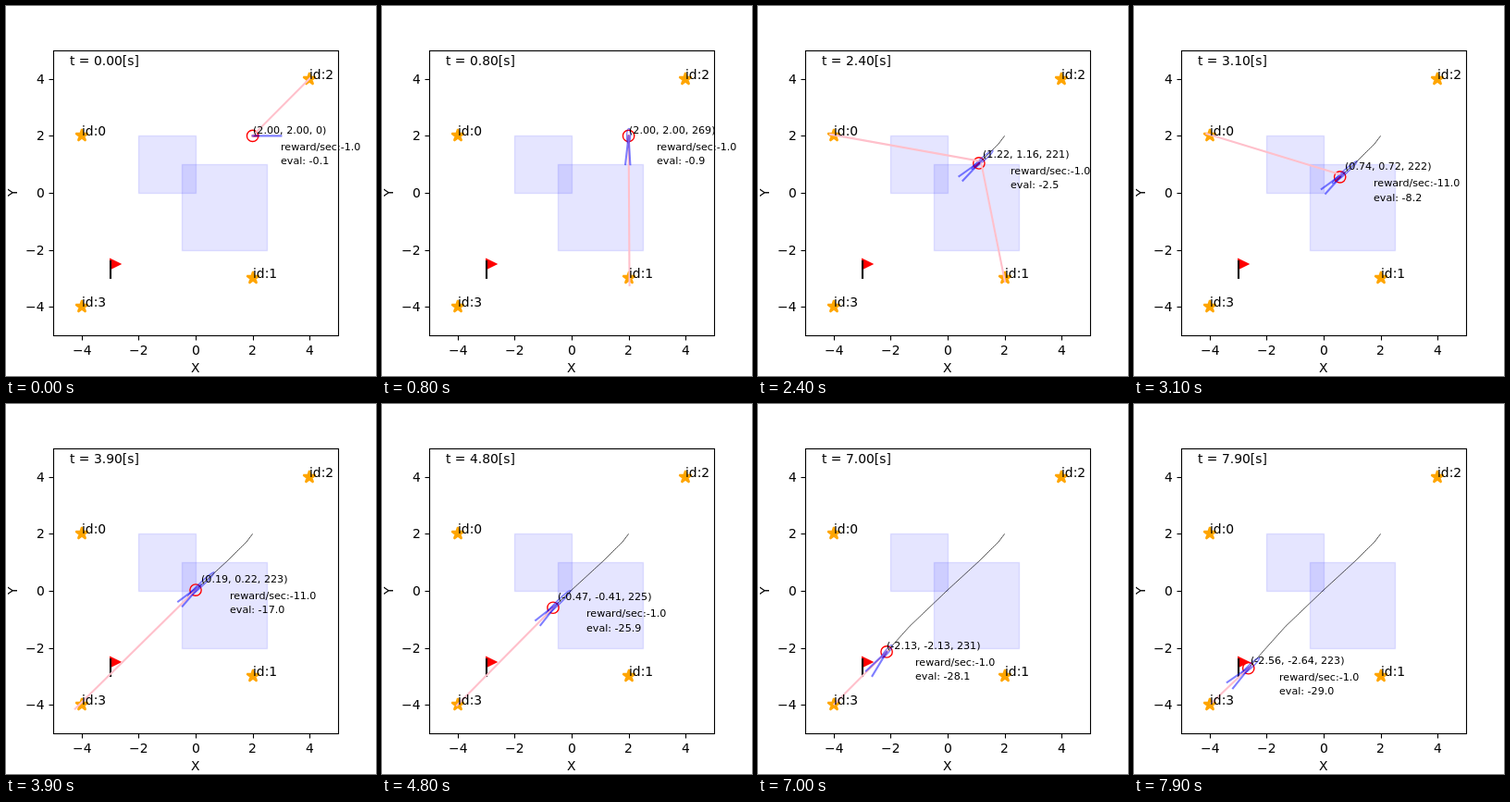
These frames come from a looping animation (400 by 400 pixels, 8 s). An HTML page with a canvas:

```html
<!DOCTYPE html>
<html lang="en">
<head>
<meta charset="utf-8">
<title>Robot localisation</title>
<style>
html, body { margin: 0; width: 100%; height: 100%; overflow: hidden; background: #fff; }
canvas { display: block; }
</style>
</head>
<body>
<canvas id="stage" width="400" height="400"></canvas>
<script>
const ctx = document.getElementById('stage').getContext('2d');
const UNIT = 30.8, STEPS = 80, PT = 100 / 72;
const px = x => 205 + UNIT * x;
const py = y => 202 - UNIT * y;
const rad = deg => deg * Math.PI / 180;
const snap = v => Math.round(v) + 0.5;
const clamp = (v, lo, hi) => Math.min(hi, Math.max(lo, v));

const landmarks = [[-4, 2], [2, -3], [4, 4], [-4, -4]];
const puddles = [[-2, 0, 0, 2], [-0.5, -2, 2.5, 1]];
const turnEnd = 11, puddleEnter = 27, puddleLeave = 48;

// Believed route: step, x, y, heading in degrees
const route = [
  [0, 2, 2, 0],
  [turnEnd, 2, 2, -126],
  [14, 1.81, 1.74, -127],
  [24, 1.22, 1.16, -139],
  [39, 0.19, 0.22, -137],
  [58, -1.21, -1.12, -133],
  [70, -2.13, -2.13, -129],
  [79, -2.56, -2.64, -137]
];

function stateAt(n) {
  const i = Math.max(1, route.findIndex(k => k[0] >= n));
  const a = route[i - 1], b = route[i];
  const u = (n - a[0]) / (b[0] - a[0]);
  const [ex, ey, heading] = [1, 2, 3].map(j => a[j] + (b[j] - a[j]) * u);
  // The belief trails the true position by a slowly swinging error.
  const lag = 0.19 * Math.abs(Math.sin(Math.PI * Math.max(0, n - turnEnd) / 60));
  return {
    ex, ey, heading, x: ex - lag, y: ey - lag,
    spread: Math.min(n, 4.5 + n / 20),
    reach: Math.min(n, 8 + 60 * lag)
  };
}

const states = Array.from({ length: STEPS }, (_, n) => stateAt(n));

function noise(seed) {
  const v = Math.sin(seed * 12.9898) * 43758.5453;
  return (v - Math.floor(v)) * 2 - 1;
}

function observe(n) {
  const s = states[n], seen = [];
  landmarks.forEach(([lx, ly], id) => {
    const dist = Math.hypot(lx - s.x, ly - s.y);
    const dir = Math.atan2(ly - s.y, lx - s.x);
    const turn = dir - rad(s.heading);
    const off = Math.atan2(Math.sin(turn), Math.cos(turn));
    if (dist >= 6 || Math.abs(off) > rad(60)) return;
    const d = dist * (1 + 0.05 * noise(n * 4 + id + 1));
    const a = dir + 0.015 * noise(n * 7 + id + 400);
    seen.push([px(s.x + d * Math.cos(a)), py(s.y + d * Math.sin(a))]);
  });
  return seen;
}

function line(points, color, width, cap = 'butt') {
  ctx.strokeStyle = color;
  ctx.lineWidth = width;
  ctx.lineCap = cap;
  ctx.lineJoin = 'round';
  ctx.beginPath();
  points.forEach(p => ctx.lineTo(...p));
  ctx.stroke();
}

// Markers sit on whole pixels.
function marker(x, y, points, color, join) {
  ctx.fillStyle = ctx.strokeStyle = color;
  ctx.lineWidth = 1.5 * PT;
  ctx.lineJoin = join;
  ctx.beginPath();
  points.forEach(([dx, dy]) => ctx.lineTo(Math.round(px(x)) + dx, Math.round(py(y)) + dy));
  ctx.closePath();
  ctx.fill();
  ctx.stroke();
}

function oval(x, y, rx, ry, tilt, color) {
  ctx.strokeStyle = color;
  ctx.lineWidth = PT;
  ctx.beginPath();
  ctx.ellipse(x, y, rx, ry, tilt, 0, 2 * Math.PI);
  ctx.stroke();
}

// anchor: 0 left, 0.5 centre, 1 right
function text(str, x, y, size = 10, anchor = 0) {
  ctx.font = `${size * PT}px "DejaVu Sans", sans-serif`;
  ctx.fillStyle = '#000';
  ctx.fillText(str, Math.round(x - anchor * ctx.measureText(str).width), Math.round(y));
}

function drawWorld() {
  ctx.fillStyle = '#fff';
  ctx.fillRect(0, 0, 400, 400);
  ctx.fillStyle = ctx.strokeStyle = 'rgba(0,0,255,.1)';
  ctx.lineWidth = PT;
  ctx.lineJoin = 'miter';
  for (const [x0, y0, x1, y1] of puddles) {
    const [l, t, r, b] = [px(x0), py(y1), px(x1), py(y0)].map(snap);
    ctx.fillRect(l, t, r - l, b - t);
    ctx.strokeRect(l, t, r - l, b - t);
  }
  const star = Array.from({ length: 10 }, (_, i) => {
    const r = 5 * PT * (i % 2 ? 0.382 : 1), a = i * Math.PI / 5;
    return [r * Math.sin(a), -r * Math.cos(a)];
  });
  for (const [x, y] of landmarks) marker(x, y, star, 'orange', 'bevel');
  const h = Math.sqrt(50) * PT / 2;
  marker(-2.84, -2.5, [[h, 0], [-h, -h], [-h, h]], 'red', 'miter');
}

function drawAxes() {
  ctx.strokeStyle = '#000';
  ctx.lineWidth = 0.8 * PT;
  ctx.lineJoin = 'miter';
  ctx.strokeRect(51.5, 48.5, 308, 308);
  for (let v = -4; v <= 4; v += 2) {
    const label = String(v).replace('-', '\u2212');
    const x = snap(px(v)), y = snap(py(v));
    line([[x, 356.5], [x, 361.5]], '#000', 0.8 * PT);
    line([[51.5, y], [46.5, y]], '#000', 0.8 * PT);
    text(label, px(v), 377, 10, 0.5);
    text(label, 41.5, py(v) + 5, 10, 1);
  }
  text('X', 205, 396, 10, 0.5);
  ctx.save();
  ctx.translate(12, 202);
  ctx.rotate(-Math.PI / 2);
  text('Y', 0, 0, 10, 0.5);
  ctx.restore();
}

function drawRobot(n, s) {
  const x = px(s.x), y = py(s.y), ex = px(s.ex), ey = py(s.ey);
  const blue = 'rgba(0,0,255,.5)', thick = 1.5 * PT;
  const ray = (cx, cy, len, deg) => [cx + len * Math.cos(rad(deg)), cy - len * Math.sin(rad(deg))];
  const spot = p => [px(p.x), py(p.y)];

  ctx.save();
  ctx.beginPath();
  ctx.rect(51, 48, 309, 309);
  ctx.clip();
  oval(x, y, 0.2 * UNIT, 0.2 * UNIT, 0, 'red');
  oval(ex, ey, s.reach, Math.min(2, s.reach / 3), -rad(s.heading), blue);
  const pole = Math.round(px(-3));
  line([[pole, 294], [pole, 276]], '#000', thick, 'square');
  line([[x, y], ray(x, y, 0.2 * UNIT, s.heading)], 'red', thick, 'square');
  line(states.slice(0, n + 1).map(spot), '#000', 0.5 * PT);
  // Sightings were made one step earlier.
  const last = Math.max(0, n - 1);
  for (const end of observe(last)) line([spot(states[last]), end], 'pink', thick, 'square');
  line([ray(ex, ey, UNIT, s.heading - s.spread), [ex, ey], ray(ex, ey, UNIT, s.heading + s.spread)],
    blue, thick, 'square');
  ctx.restore();
}

function drawLabels(n, s) {
  const ex = px(s.ex), ey = py(s.ey);
  const degrees = (Math.trunc(s.heading) + 360) % 360;
  const wet = n >= puddleEnter && n < puddleLeave;
  const wetSteps = clamp(n + 1, puddleEnter, puddleLeave) - puddleEnter;
  const cost = 0.1 * (n + 1) + wetSteps;
  landmarks.forEach(([x, y], id) => text('id:' + id, px(x), py(y)));
  text(`t = ${(n / 10).toFixed(2)}[s]`, px(-4.4), 64);
  text(`(${s.ex.toFixed(2)}, ${s.ey.toFixed(2)}, ${degrees})`, ex, Math.ceil(ey - 0.1 * UNIT), 8);
  text(`reward/sec:${wet ? '-11.0' : '-1.0'}`, ex + UNIT, ey + 0.5 * UNIT, 8);
  text(`eval: -${cost.toFixed(1)}`, ex + UNIT, ey + UNIT, 8);
}

function frame() {
  const n = Math.floor(performance.now() / 100) % STEPS;
  drawWorld();
  drawRobot(n, states[n]);
  drawAxes();
  drawLabels(n, states[n]);
  requestAnimationFrame(frame);
}
frame();
</script>
</body>
</html>
```
